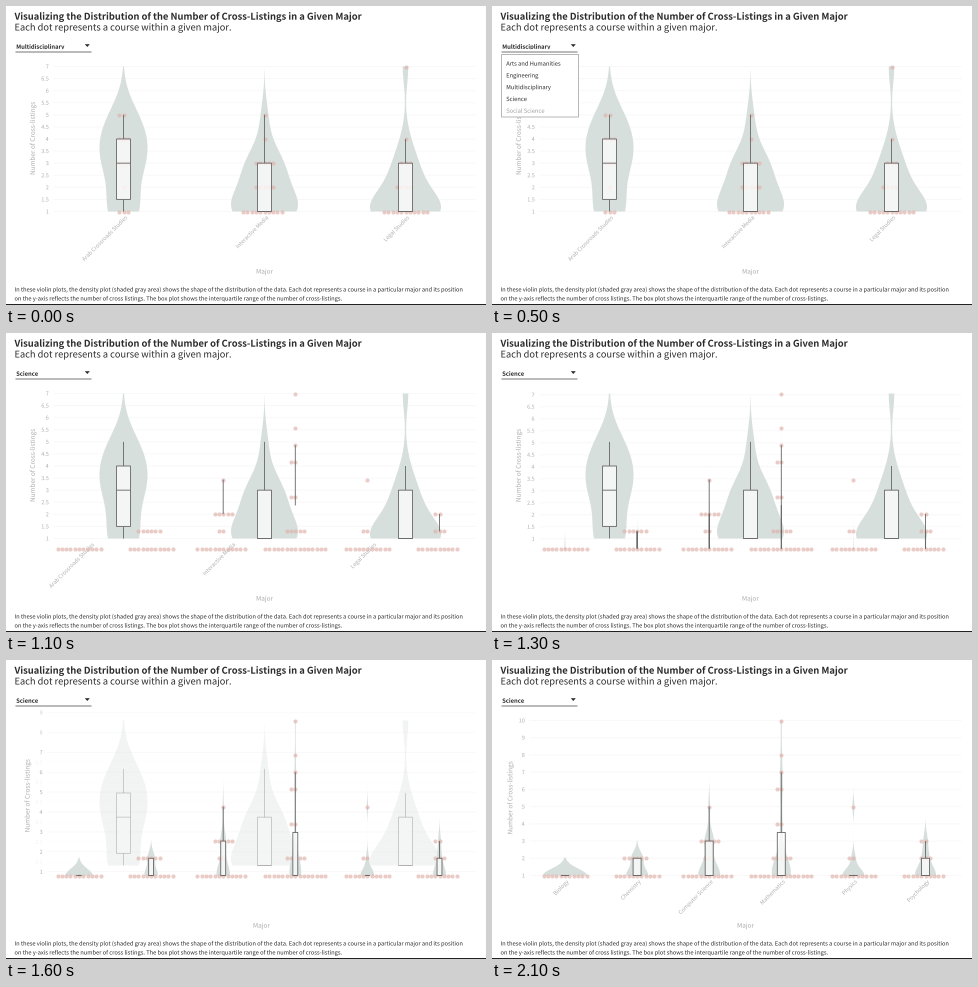
Write a matplotlib script that moves like this. It is 480 by 299 pixels and loops after 2.2 s.

```python
import numpy as np
import matplotlib.pyplot as plt
from matplotlib.animation import FuncAnimation
from matplotlib.patches import PathPatch, Polygon, Rectangle
from matplotlib.textpath import TextPath
from matplotlib.transforms import Affine2D

WIDTH, HEIGHT, DPI = 480, 299, 64
PT = 72 / DPI  # points per pixel
STEP_MS, STEPS = 100, 22

FONT = "Noto Sans CJK JP"
INK, MUTED, LINE = "#2b2b2b", "#adadad", "#6a6a6a"
VIOLIN, DOT = "#d7dfdd", "#dfb0a8"
CHART_TOP, DOT_STEP = 60, 4.3
MENU = ["Arts and Humanities", "Engineering", "Multidisciplinary",
        "Science", "Social Science"]

fig = plt.figure(figsize=(WIDTH / DPI, HEIGHT / DPI), dpi=DPI, facecolor="white")
ax = fig.add_axes([0, 0, 1, 1])


def mix(a, b, p):
    return a + (b - a) * p


def clamp(v):
    return min(max(v, 0), 1)


def ease(t):
    t = clamp(t)
    return 4 * t ** 3 if t < .5 else 1 - 4 * (1 - t) ** 3


def text(x, y, s, px, color=INK, weight="normal", align=0, middle=False,
         angle=0, **kw):
    """Outline text; align is the share of its width left of x."""
    path = TextPath((0, 0), s, size=px, prop={"family": FONT, "weight": weight})
    shift = -align * path.get_extents().x1, -.37 * px * middle
    place = (Affine2D().translate(*shift).scale(1, -1)
             .rotate_deg(-angle).translate(x, y))
    ax.add_patch(PathPatch(place.transform_path(path), facecolor=color, lw=0,
                           snap=False, **kw))


def line(xs, ys, color, px=.9, **kw):
    ax.plot(xs, ys, color=color, lw=px * PT, solid_capstyle="butt",
            snap=False, **kw)


def rect(x0, y0, x1, y1, face="white", edge="none", px=.9, **kw):
    ax.add_patch(Rectangle((x0, y0), x1 - x0, y1 - y0, facecolor=face,
                           edgecolor=edge, lw=px * PT, snap=False, **kw))


class Plot:
    """A violin (kernel density of the dots), its dots and its box."""

    def __init__(self, x, base, limit, name, counts, box, band, width):
        self.x, self.base, self.limit, self.name = x, base, limit, name
        self.counts, self.box, self.band, self.width = counts, box, band, width

    def y(self, v):
        return mix(self.base, CHART_TOP, (v - 1) / (self.limit - 1))

    def draw_violin(self, grow, alpha):
        v = np.linspace(1, min(max(self.counts) + 2.6 * self.band, self.limit), 120)
        density = sum(n * np.exp(-((v - c) / self.band) ** 2 / 2)
                      for c, n in self.counts.items())
        half = density / density.max() * self.width * grow
        xs = np.r_[self.x - half, (self.x + half)[::-1]]
        ys = self.y(np.r_[v, v[::-1]])
        ax.add_patch(Polygon(np.c_[xs, ys], facecolor=VIOLIN, lw=0,
                             alpha=alpha, zorder=2))

    def draw_dots(self):
        spots = [(self.x + (i - n // 2) * DOT_STEP, self.y(v))
                 for v, n in self.counts.items() for i in range(n)]
        ax.scatter(*zip(*spots), s=(4.1 * PT) ** 2, color=DOT, alpha=.65, lw=0,
                   zorder=4)

    def draw_box(self, half, alpha):
        low, median, high, top = map(self.y, self.box)
        for ends in ((top, high), (low, self.base)):
            line([self.x] * 2, ends, LINE, alpha=alpha, zorder=5)
        if half > 0:
            rect(self.x - half, high, self.x + half, low, (1, 1, 1, .75 * alpha),
                 zorder=6)
            rect(self.x - half, high, self.x + half, low, "none", LINE,
                 alpha=alpha, zorder=6)
            line([self.x - half, self.x + half], [median] * 2, LINE, alpha=alpha,
                 zorder=7)

    def draw_name(self, alpha, dx=0):
        text(self.x + dx + 2.5, self.base + 5.3, self.name, 5.4, MUTED, align=1,
             middle=True, angle=45, alpha=alpha, zorder=3)


def row(first, gap, base, limit, *specs):
    return [Plot(first + i * gap, base, limit, *s) for i, s in enumerate(specs)]


# Name, dots per value, (lower quartile, median, upper quartile, whisker),
# bandwidth and half width of the violin
BEFORE = row(
    117, 141, 205, 7,
    ("Arab Crossroads Studies", {5: 2, 4: 3, 3: 3, 2: 1, 1: 3}, (1.5, 3, 4, 5), .85, 24),
    ("Interactive Media", {5: 1, 4: 1, 3: 5, 2: 5, 1: 10}, (1, 1, 3, 5), .72, 33.5),
    ("Legal Studies", {7: 1, 4: 1, 3: 3, 2: 4, 1: 11}, (1, 1, 3, 4), .72, 35.5))
AFTER = row(
    72.5, 72.1, 215, 10,
    ("Biology", {1: 11}, (1, 1, 1, 1), .4, 22),
    ("Chemistry", {2: 6, 1: 11}, (1, 1, 2, 2), .4, 11),
    ("Computer Science", {5: 1, 3: 5, 2: 2, 1: 12}, (1, 1, 3, 5), .6, 11),
    ("Mathematics", {10: 1, 8: 1, 7: 1, 6: 2, 4: 2, 2: 5, 1: 15}, (1, 1, 3.5, 7), .8, 9.5),
    ("Physics", {5: 1, 2: 2, 1: 11}, (1, 1, 1, 1), .4, 11),
    ("Psychology", {3: 2, 2: 3, 1: 10}, (1, 1, 2, 3), .5, 10.5))


def axes(p):
    base, unit = mix(205, 215, p), mix(145 / 6, 155 / 9, p)
    for v in np.arange(1, 10.5, .5):
        y = base - (v - 1) * unit
        if v % 1:
            alpha = clamp(1 - 1.4 * p) if v < 7 else 0
        else:
            alpha = 1 if v <= 7 else p
        if alpha > 0 and y > 52:
            line([mix(47, 37, p), 469], [y, y], "#f8f8f8", alpha=alpha, zorder=1)
            text(mix(42, 32, p), y, f"{v:g}", 5.4, MUTED, align=1, middle=True,
                 alpha=alpha, zorder=3)
    text(mix(26, 17.5, p), mix(132, 137.5, p), "Number of Cross-listings", 6.4,
         MUTED, align=.5, middle=True, angle=90)
    text(mix(258, 253, p), 267.2, "Major", 6.4, MUTED, align=.5)


def page():
    text(8, 13.2, "Visualizing the Distribution of the Number of Cross-Listings "
         "in a Given Major", 9.35, weight="bold")
    text(8, 24, "Each dot represents a course within a given major.", 9.27)
    text(8, 285, "In these violin plots, the density plot (shaded gray area) "
         "shows the shape of the distribution of the data. Each dot represents "
         "a course in a particular major and its position", 5.7)
    text(8, 294, "on the y-axis reflects the number of cross listings. The box "
         "plot shows the interquartile range of the number of cross-listings.",
         5.7)
    rect(-.5, HEIGHT - 1.5, WIDTH, HEIGHT, "#222222", px=0)


def selector(choice):
    text(9.7, 42.3, choice, 5.8, weight="bold", zorder=7)
    rect(9, 42.7, 72, 45, px=0, zorder=8)  # cuts off the descenders
    line([9, 85], [45.5, 45.5], "#666666", zorder=8)
    ax.add_patch(Polygon([(78.3, 37.7), (83.3, 37.7), (80.8, 40.5)],
                         facecolor=INK, lw=0, zorder=8))


def menu(hovered):
    rect(9, 48, 86, 110.5, "white", "#b0b0b0", zorder=9)
    for i, item in enumerate(MENU):
        text(13.7, 57 + 11.8 * i, item, 5.75,
             "#a0a0a0" if item == hovered else INK, middle=True, zorder=10)


def draw(i):
    ms = i * STEP_MS
    ax.clear()
    # Whole coordinates are pixel centres
    ax.set(xlim=(-.5, WIDTH - .5), ylim=(HEIGHT - .5, -.5))
    ax.axis("off")
    page()
    switched = ms >= 1100
    p = ease((ms - 1150) / 830)
    axes(p)
    selector("Science" if switched else "Multidisciplinary")

    fade = clamp(1 - (ms - 1300) / 450)
    name_fade = clamp((1300 - ms) / 200)
    for plot in BEFORE:
        if fade > 0:
            plot.draw_violin(1, fade)
            plot.draw_box(7, fade)
        if not switched:
            plot.draw_dots()
        if name_fade > 0:
            plot.draw_name(name_fade, -33 if switched else 0)
    if switched:
        for plot in AFTER:
            plot.draw_violin(p, 1)
            plot.draw_dots()
            plot.draw_box(4 * p, 1)
            if ms > 1800:
                plot.draw_name(clamp((ms - 1800) / 300))

    if 100 <= ms < 1100:
        if ms < 400:
            hovered = None
        else:
            hovered = "Social Science" if 500 <= ms < 800 else "Science"
        menu(hovered)
    return []


animation = FuncAnimation(fig, draw, frames=STEPS, interval=STEP_MS, repeat=True,
                          repeat_delay=0, blit=False)
plt.show()
```
